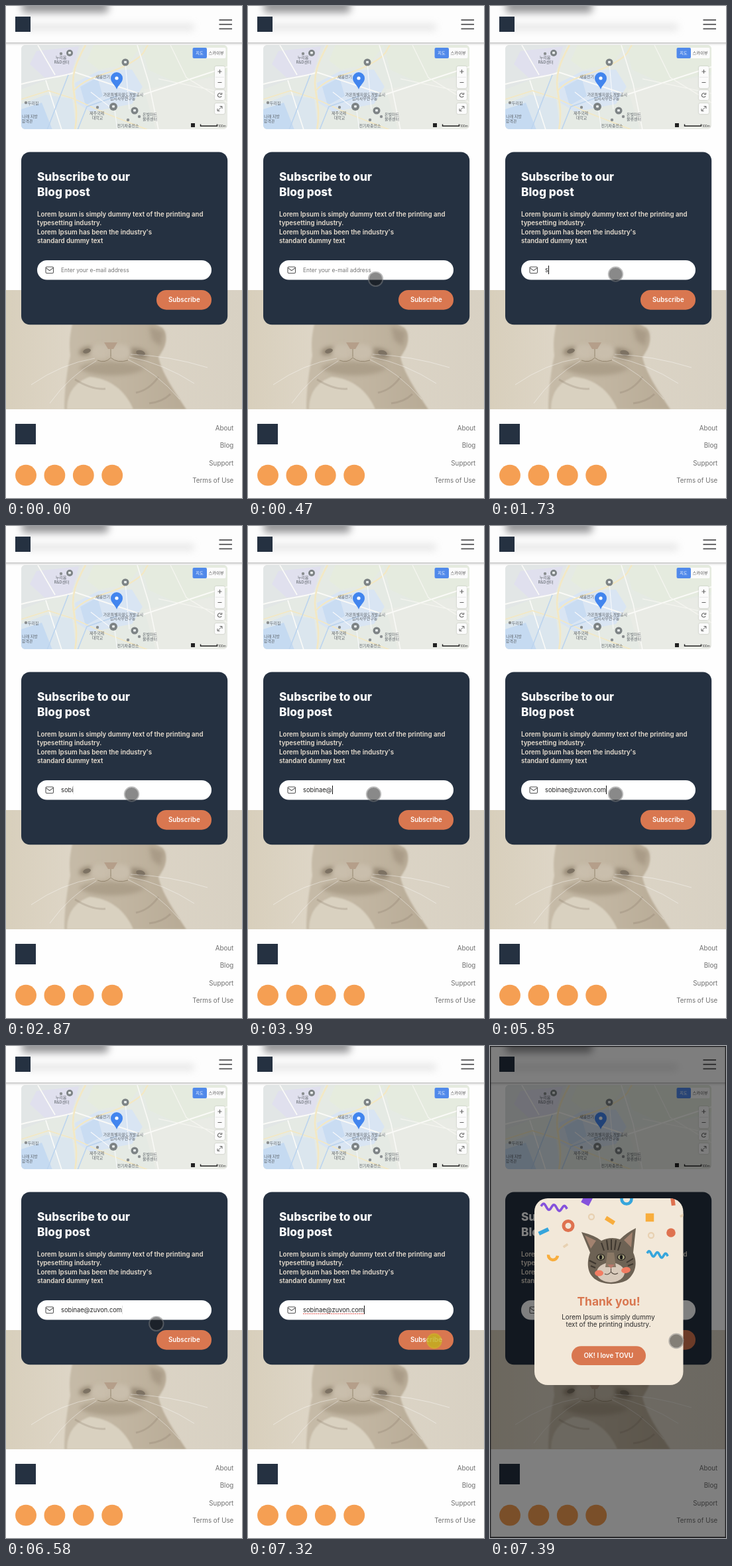
An HTML page with a canvas for the animation above (8000 ms loop, 356 px wide and 743 px high).

```html
<!DOCTYPE html>
<html lang="en">
<head>
<meta charset="utf-8">
<title>Subscribe form</title>
<style>
html, body { margin: 0; width: 100%; height: 100%; overflow: hidden; background: #fefefe; }
canvas { display: block; width: 356px; height: 743px; }
</style>
</head>
<body>
<canvas id="stage"></canvas>
<script>
const W = 356, H = 743, LOOP = 8000;
const NAVY = '#253141', CORAL = '#d97750', CREAM = '#f2e8d9', ORANGE = '#f59f53';
const SANS = 'Inter, sans-serif';
const KOREAN = '"Noto Sans CJK KR", "Noto Sans CJK", sans-serif';
const dpr = window.devicePixelRatio || 1;

function setup(canvas) {
  canvas.width = W * dpr;
  canvas.height = H * dpr;
  const c = canvas.getContext('2d');
  c.scale(dpr, dpr);
  return c;
}

const stage = document.getElementById('stage');
const view = setup(stage);
let ctx = view;

// ---------- drawing helpers ----------
function box(x, y, w, h, r, fill) {
  ctx.beginPath();
  ctx.roundRect(x, y, w, h, r);
  ctx.fillStyle = fill;
  ctx.fill();
}
function oval(x, y, rx, ry, fill, turn = 0) {
  ctx.beginPath();
  ctx.ellipse(x, y, rx, ry, turn, 0, Math.PI * 2);
  ctx.fillStyle = fill;
  ctx.fill();
}
function ring(x, y, r, width, color, from = 0, to = Math.PI * 2) {
  ctx.beginPath();
  ctx.arc(x, y, r, from, to);
  ctx.lineWidth = width;
  ctx.strokeStyle = color;
  ctx.stroke();
}
function path(d, fill) {
  ctx.fillStyle = fill;
  ctx.fill(new Path2D(d));
}
function line(d, width, color) {
  ctx.lineWidth = width;
  ctx.strokeStyle = color;
  ctx.stroke(new Path2D(d));
}
function tilted(x, y, w, h, deg, fill) {
  ctx.save();
  ctx.translate(x, y);
  ctx.rotate(deg * Math.PI / 180);
  ctx.fillStyle = fill;
  ctx.fillRect(-w / 2, -h / 2, w, h);
  ctx.restore();
}
function text(s, x, y, size, color, weight = 400, align = 'left', family = SANS) {
  ctx.font = `${weight} ${size}px ${family}`;
  ctx.textAlign = align;
  ctx.fillStyle = color;
  ctx.fillText(s, x, y);
}
function clipped(x, y, w, h, r, draw) {
  ctx.save();
  ctx.beginPath();
  ctx.roundRect(x, y, w, h, r);
  ctx.clip();
  draw();
  ctx.restore();
}
function blurred(radius, draw) {
  ctx.filter = `blur(${radius * dpr}px)`;
  draw();
  ctx.filter = 'none';
}

// ---------- page ----------
function drawHeader() {
  ctx.save();
  ctx.shadowColor = 'rgba(0,0,0,.35)';
  ctx.shadowBlur = 4 * dpr;
  ctx.shadowOffsetY = dpr;
  ctx.fillStyle = '#fdfdfd';
  ctx.fillRect(-6, -6, W + 12, 61);
  ctx.restore();
  clipped(0, 0, W, 55, 0, () => blurred(6, () => {
    box(24, -10, 130, 20, 4, 'rgba(80,80,84,.6)');
    box(30, 27, 254, 10, 4, 'rgba(150,150,150,.22)');
  }));
  box(14, 16, 23, 23, 0, NAVY);
  for (const y of [20.3, 26.9, 33.6]) box(321.5, y, 19.5, 1.7, 0, '#4b4b4d');
}

function drawMap() {
  clipped(23, 59, 311, 127, 6, () => {
    ctx.fillStyle = '#e5eae4';
    ctx.fillRect(23, 55, 311, 132);
    path('M23 59H116L98 104L60 112L23 126Z', '#e2e6e6');
    path('M46 68L110 61L98 104L58 108L36 88Z', '#e0e0ee');
    path('M132 59H205L184 88L140 96L122 82Z', '#e6ecde');
    path('M104 116L140 98L190 96L206 122L190 148L128 160L106 146Z', '#d9e5f3');
    path('M112 122L138 108L146 136L120 150Z', '#c9dcf2');
    path('M23 148L60 134L100 140L106 187H23Z', '#dbe6ee');
    path('M23 156L54 146L70 187H23Z', '#c5daf1');
    path('M205 59H334V100L262 118L214 96Z', '#e5ebdf');
    path('M208 126L334 104V187H226Z', '#e9ebe5');

    line('M23 118C60 108 92 106 104 100L206 134L334 92', 2, '#fafaf7');
    line('M48 59L74 104M60 112L84 187', 1.6, '#fbfbf8');
    line('M120 59C106 84 98 104 102 128S108 164 104 187', 2.6, '#f3e8c4');
    line('M102 128C124 104 156 104 184 88S206 70 214 59', 2.2, '#f3e8c4');
    line('M23 141L64 128L102 140L150 162L214 187', 1.8, '#f3e8c4');
    line('M198 59L216 118L230 187', 1.6, '#f9f9f6');
    line('M248 59L272 108L334 146M230 110L334 132', 1.2, '#f6f6f1');
    line('M62 187L84 130L94 104M108 187L122 152L168 136', 1.6, '#bcd4ee');
    line('M128 130L164 158L168 187M180 86L186 156', 1.1, '#f8f9fb');

    const label = (s, x, y, size = 6) => text(s, x, y, size, '#5c6268', 500, 'center', KOREAN);
    label('누리봄', 83, 80);
    label('R&D센터', 84, 87);
    label('새봄전기', 146, 109);
    label('가온특별자원도개발공사', 177, 135.5);
    label('임시사무연구동', 176, 142);
    label('두리집', 41, 148.5);
    label('제주국제', 137, 163.5);
    label('대학교', 138, 170.5);
    label('온빛마트', 217, 166);
    label('물류센터', 217, 172.5);
    label('전기차충전소', 184, 182.5);
    label('나래 지방', 36, 169);
    label('합격관', 32, 176);

    for (const [x, y, r] of [[96, 71, 5], [162, 152, 6], [194, 158, 5.5], [180, 85, 5.5]]) {
      oval(x, y, r, r, '#7d8385');
      box(x - 2, y - 2, 4, 3.5, 1, '#e9eded');
    }
    for (const [x, y] of [[30, 146], [138, 153], [201, 167], [184, 172], [83, 72]])
      oval(x, y, 2.2, 2.2, '#8b8f91');

    path('M167 126C165 119 158 116 158 109A9 9 0 0 1 176 109C176 116 169 119 167 126Z', '#4285ee');
    oval(167, 109, 2.6, 2.6, '#fff');

    box(281.5, 63, 50, 16, 2, '#fbfbfb');
    box(281.5, 63, 21.5, 16, 2, '#5089ea');
    text('지도', 292, 73.3, 6.2, '#fff', 500, 'center', KOREAN);
    text('스카이뷰', 317, 73.3, 6.2, '#555', 500, 'center', KOREAN);

    ctx.save();
    ctx.shadowColor = 'rgba(0,0,0,.25)';
    ctx.shadowBlur = 2 * dpr;
    box(315, 91, 15, 33, 2, '#fbfbfb');
    box(315, 127, 15, 15, 2, '#fbfbfb');
    box(315, 147, 15, 16, 2, '#fbfbfb');
    ctx.restore();
    line('M319.5 99H325.5M322.5 96V102M319.5 115.5H325.5', 1.1, '#666');
    line('M316 107.5H329', .6, '#ddd');
    ring(322.5, 134.7, 3, 1.1, '#666', .5, 5.4);
    line('M325.7 131V133.6H323', 1, '#666');
    line('M319.5 158L325.5 152M319 155V158.5H322.5M322.5 151.5H326V155', 1, '#666');

    box(279, 177, 6, 6, 0, '#222');
    line('M293.5 178.5V181.3H318.5V178.5', 1.4, '#222');
    text('100m', 320, 183, 4.6, '#555', 500);
  });
}

function drawPhoto() {
  clipped(0, 429, W, 180, 0, () => {
    const wall = ctx.createLinearGradient(0, 0, W, 0);
    wall.addColorStop(0, '#d8cfbc');
    wall.addColorStop(.3, '#ded6c7');
    wall.addColorStop(1, '#d8d1c3');
    ctx.fillStyle = wall;
    ctx.fillRect(0, 429, W, 180);

    const fur = ctx.createLinearGradient(90, 0, 270, 0);
    fur.addColorStop(0, '#c6bba8');
    fur.addColorStop(.45, '#c2b6a2');
    fur.addColorStop(1, '#b8ab96');
    blurred(1, () => {
      path('M88 609C88 580 92 550 97 528C95 510 96 494 102 474H214L236 486C244 496 244 512 230 530C234 552 254 582 272 609Z', fur);
      path('M92 609C92 584 104 568 126 560C156 562 180 580 192 609Z', '#d9d1c0');
    });
    blurred(3, () => {
      path('M110 546C130 534 184 534 210 546C196 562 124 562 110 546Z', '#ac9f8a');
      path('M216 484L238 492L234 514L220 504Z', '#a99b87');
      oval(121, 521, 11, 6, '#978a76', -.3);
      oval(199, 525, 15, 8, '#978a76', .25);
      oval(142, 522, 15, 11, '#c9beac');
      oval(172, 523, 17, 12, '#c9beac');
    });
    oval(122, 521, 6, 3.4, '#7d7263', -.3);
    oval(203, 524, 7, 4, '#7d7263', .25);
    path('M148 508H168L162 518H154Z', '#b59f8a');
    line('M158 518V530M138 535Q150 540 158 531Q168 540 184 535', 1, '#94866f');
    line('M104 564Q130 580 150 578M230 560Q216 580 196 584M248 586Q236 598 216 600', 3, 'rgba(132,117,99,.25)');
    line('M186 530Q238 540 284 570M184 534Q226 552 262 594M134 532Q84 540 38 572M136 536Q96 558 66 600M188 526Q246 528 304 546', .6, 'rgba(255,255,255,.7)');
  });
}

function drawCard() {
  box(23, 220.4, 311.2, 260.8, 13, NAVY);
  text('Subscribe to our', 47, 264, 17.2, '#fff', 800);
  text('Blog post', 47, 287, 17.2, '#fff', 800);
  [
    'Lorem Ipsum is simply dummy text of the printing and',
    'typesetting industry.',
    "Lorem Ipsum has been the industry's",
    'standard dummy text'
  ].forEach((s, i) => text(s, 47, 318 + i * 13.4, 9.7, '#e9dfd0', 600));
  box(47, 384, 263, 29.5, 14.75, '#fff');
  ctx.lineWidth = 1.1;
  ctx.strokeStyle = '#555';
  ctx.beginPath();
  ctx.roundRect(60, 394, 11.5, 9.5, 1.6);
  ctx.stroke();
  line('M60.4 395.6L65.75 399.6L71.1 395.6', 1.1, '#555');
  box(227, 429, 83, 29.7, 14.8, CORAL);
  text('Subscribe', 268.8, 447, 9.75, '#fff', 600, 'center');
}

function drawFooter() {
  ctx.fillStyle = '#fefefe';
  ctx.fillRect(0, 609, W, 134);
  box(14, 631, 31, 31, 0, NAVY);
  for (let i = 0; i < 4; i++) oval(30 + i * 43.4, 708.7, 15.9, 15.9, ORANGE);
  ['About', 'Blog', 'Support', 'Terms of Use'].forEach((s, i) =>
    text(s, 343.3, 641 + i * 26.3, 9.8, '#707070', 400, 'right'));
}

// ---------- dialog ----------
function squiggle(x, y, step, amp, tilt, color) {
  ctx.beginPath();
  for (let i = 0; i <= 40; i++) {
    const px = x + i * step, py = y + i * tilt - Math.sin(i / 40 * Math.PI * 5) * amp;
    i ? ctx.lineTo(px, py) : ctx.moveTo(px, py);
  }
  ctx.lineWidth = 3.6;
  ctx.strokeStyle = color;
  ctx.stroke();
}

function drawConfetti() {
  const purple = '#8552dc', blue = '#36a5dc', amber = '#f8ad3d', red = '#df7250', sand = '#e8d1b2';
  squiggle(77, 242, .98, 4.2, .1, purple);
  squiggle(237, 313, .78, 3.6, .11, blue);
  tilted(146, 233, 13, 13, 28, purple);
  ring(206, 231, 7.5, 4.6, blue);
  tilted(276, 235, 6, 12, -8, red);
  ring(118, 271.5, 7, 5, red);
  ring(153, 258, 4, 2.3, sand);
  ring(243, 286, 4, 2.3, sand);
  tilted(181, 263.5, 15, 6.5, 32, amber);
  tilted(241, 259, 12.5, 12.5, 0, amber);
  tilted(81, 280, 16, 6, -25, blue);
  tilted(114, 301.5, 8, 3.6, -35, sand);
  tilted(290, 256, 7, 3.6, -30, sand);
  ring(95, 316, 7, 4.5, amber, .1, Math.PI + .1);
  oval(273, 282, 6.8, 6.8, red);
}

function drawCat() {
  path('M151 312L138 281Q158 286 168 294Q182 287 196 292Q206 282 220 275L216 312C224 330 218 346 206 354C192 361 172 361 160 353C147 345 145 328 151 312Z', '#6d6254');
  path('M143 286L160 294L152 306ZM215 281L202 293L213 304Z', '#a2826f');
  line('M176 293L178 308M183 292V308M190 293L188 308M168 297L172 309M197 296L193 309', 2, '#3e372f');
  line('M150 324L160 329M152 332L159 335M216 321L206 327M216 329L208 332', 2, '#3e372f');
  oval(182, 342, 21, 15, '#d8cabb');
  path('M177 312H187L190 334H174Z', '#8a7865');
  for (const x of [167, 198]) {
    oval(x, 319, 6.4, 5, '#2d2823');
    oval(x, 319, 5, 3.9, '#a9a580');
    oval(x, 319, 2.2, 3.4, '#1c1a18');
  }
  path('M177 330H188L182.5 336Z', '#b6786a');
  line('M182.5 336V341M173 344Q178 347 182.5 341Q187 347 193 343', 1.1, '#554a40');
  oval(164.5, 343, 6.5, 4.6, '#f27c62');
  oval(205, 338.5, 7, 4.6, '#f27c62', -.15);
}

function drawDialog() {
  ctx.fillStyle = 'rgba(0,0,0,.5)';
  ctx.fillRect(0, 0, W, H);
  ctx.strokeStyle = '#1c1c1e';
  ctx.lineWidth = 2;
  ctx.strokeRect(.3, .3, W - .6, H - 1);
  box(67, 230, 224.5, 282, 20, CREAM);
  clipped(67, 230, 224.5, 282, 20, drawConfetti);
  drawCat();
  text('Thank you!', 179, 392, 17.4, CORAL, 700, 'center');
  text('Lorem Ipsum is simply dummy', 178.5, 413, 9.8, '#2a2a2a', 400, 'center');
  text('text of the printing industry.', 178.5, 424, 9.8, '#2a2a2a', 400, 'center');
  box(123, 453.3, 112, 28.7, 14.3, CORAL);
  text('OK! I love TOVU', 178.8, 471.3, 9.75, '#fff', 600, 'center');
}

// ---------- input and pointer ----------
const EMAIL = 'sobinae@zuvon.com';
const KEYS = [1730, 1860, 2210, 2340, 2930, 3000, 3200, 3990, 4800, 4930, 5060, 5260, 5400, 5520, 5600, 5720, 5850];
const FOCUS = 670, SPELL = 6850, OPEN = 7390;

function drawInput(t) {
  const count = KEYS.filter(k => t >= k).length;
  const typed = EMAIL.slice(0, count);
  if (count) text(typed, 83, 402, 9.3, '#222');
  else text('Enter your e-mail address', 83, 402, 8.45, '#757575');
  if (t < FOCUS) return;

  ctx.font = `400 9.3px ${SANS}`;
  const end = 83 + (count ? ctx.measureText(typed).width : 0);
  if (t >= SPELL) {
    ctx.setLineDash([1.6, 1.2]);
    line(`M83 404.4H${end}`, 1.1, '#e0524c');
    ctx.setLineDash([]);
  }
  const since = t - (count ? KEYS[count - 1] : FOCUS);
  const on = since % 1060 < 530;
  ctx.fillStyle = on ? '#111' : 'rgba(0,0,0,.12)';
  ctx.fillRect(Math.round(end), 392, 1, 13);
}

const STEP = 66.6;
const snap = (t, from) => from + Math.floor((t - from) / STEP) * STEP;
const easeOut = u => 1 - (1 - Math.min(1, Math.max(0, u))) ** 2;
const mix = (a, b, p) => a + (b - a) * p;

function pointerAt(t) {
  if (t < 6580) {
    const p = easeOut((snap(t, 70) - 70) / 470);
    return [mix(326, 189.5, p), mix(734, 405, p)];
  }
  if (t < 7120) {
    const p = easeOut((snap(t, 6580) - 6464) / 516);
    return [mix(189.5, 283, p), mix(405, 441, p)];
  }
  return [281, 445.5];
}

function drawPointer(t) {
  if (t < 70) return;
  const [x, y] = pointerAt(t);
  const pressed = (t >= 670 && t < 740) || (t >= 7190 && t < OPEN);
  oval(x, y, 10, 10, pressed ? 'rgba(192,176,28,.8)' : 'rgba(20,20,20,.5)');
  ring(x, y, 10.7, 2, pressed ? 'rgba(205,180,36,.75)' : 'rgba(125,125,125,.5)');
}

// ---------- static layers, then playback ----------
function layer(draw) {
  const canvas = document.createElement('canvas');
  ctx = setup(canvas);
  draw();
  ctx = view;
  return canvas;
}

const page = layer(() => {
  ctx.fillStyle = '#fefefe';
  ctx.fillRect(0, 0, W, H);
  drawMap();
  drawPhoto();
  drawCard();
  drawFooter();
  drawHeader();
});
const dialog = layer(drawDialog);

const start = performance.now();
function frame() {
  const t = (performance.now() - start) % LOOP;
  view.drawImage(page, 0, 0, W, H);
  drawInput(t);
  if (t >= OPEN) view.drawImage(dialog, 0, 0, W, H);
  drawPointer(t);
  requestAnimationFrame(frame);
}
frame();
</script>
</body>
</html>
```
